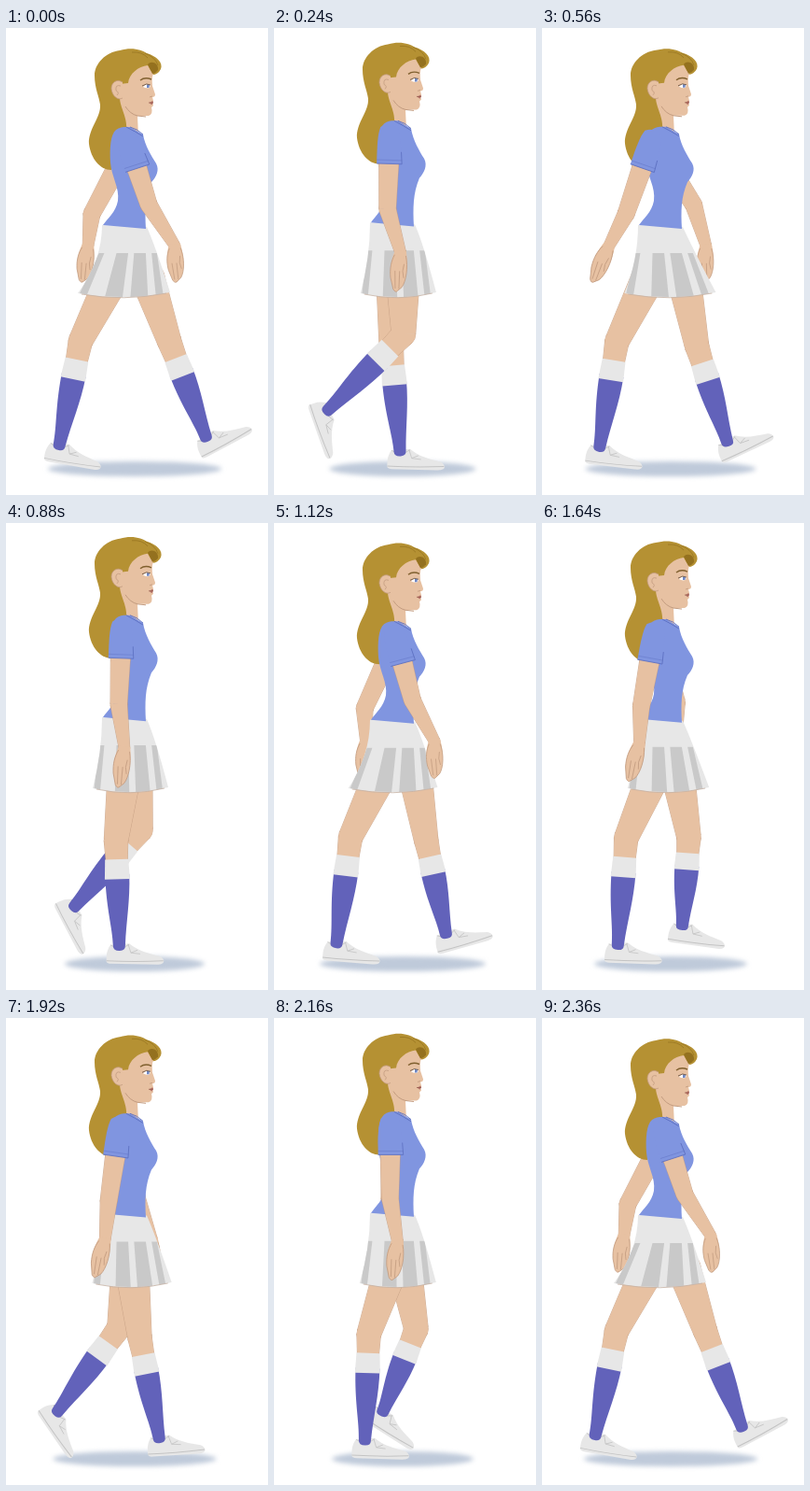
Animation of 281x500 px, one loop 2400 ms. Source, as an HTML page with a canvas:

```html
<!DOCTYPE html>
<html lang="en">
<head>
<meta charset="utf-8">
<title>Walk cycle</title>
<style>
html, body { margin: 0; width: 100%; height: 100%; overflow: hidden; background: #fff; }
canvas { display: block; }
</style>
</head>
<body>
<canvas id="stage" width="281" height="500"></canvas>
<script>
const ctx = document.getElementById('stage').getContext('2d');
const LOOP = 2400, STEP = 40, CYCLE = 1180;
const SKIN = '#e7c1a2', SKIN_LINE = '#c39c80', HAIR = '#b59133', HAIR_DARK = '#94711f';
const SHIRT = '#8095e0', SHIRT_LINE = '#5c6fc0', SOCK = '#6262ba', WHITE = '#e7e7e7', GREY = '#c9c9c9';

// Key poses of one step: time since heel strike, knee x y, ankle x y, foot angle
const LEG = [
  [0, 175, 335, 216, 441, -28],
  [180, 137, 342, 155, 455, 0],
  [290, 118, 340, 122, 456, 1],
  [590, 80, 335, 57, 450, 10],
  [750, 124, 331, 54, 423, 58],
  [855, 142, 328, 62, 412, 68],
  [1150, 166, 340, 200, 446, -25]
];

const angleAt = p => p / CYCLE * 2 * Math.PI;
// Limbs rest at both ends of the swing and pass the middle quickly
const swing = p => Math.cos(angleAt(p)) ** 3;

// Smooth periodic interpolation through unevenly spaced keys
function pose(keys, time) {
  const t = time % CYCLE, n = keys.length;
  const key = i => {
    const k = keys[(i + n) % n].slice();
    k[0] += Math.floor(i / n) * CYCLE;
    return k;
  };
  let i = n - 1;
  while (keys[i][0] > t) i--;
  const [a, b, c, d] = [key(i - 1), key(i), key(i + 1), key(i + 2)];
  const span = c[0] - b[0], u = (t - b[0]) / span, v = 1 - u;
  return b.map((_, j) => {
    const m0 = (c[j] - a[j]) / (c[0] - a[0]) * span;
    const m1 = (d[j] - b[j]) / (d[0] - b[0]) * span;
    return v * v * ((1 + 2 * u) * b[j] + u * m0) + u * u * ((3 - 2 * u) * c[j] - v * m1);
  }).slice(1);
}

function fill(path, color) {
  ctx.fillStyle = color;
  ctx.fill(new Path2D(path));
}

function line(path, color, width = 1) {
  ctx.strokeStyle = color;
  ctx.lineWidth = width;
  ctx.stroke(new Path2D(path));
}

// Rounded, tapering limb through [x, y, radius] joints
function limb(joints) {
  const shape = new Path2D();
  joints.forEach(([x, y, r], i) => {
    shape.moveTo(x + r, y);
    shape.arc(x, y, r, 0, 7);
    if (!i) return;
    const [px, py, pr] = joints[i - 1];
    const a = Math.atan2(y - py, x - px), s = Math.sin(a), c = Math.cos(a);
    shape.moveTo(px - s * pr, py + c * pr);
    shape.lineTo(px + s * pr, py - c * pr);
    shape.lineTo(x + s * r, y - c * r);
    shape.lineTo(x - s * r, y + c * r);
    shape.closePath();
  });
  ctx.strokeStyle = SKIN_LINE;
  ctx.lineWidth = .8;
  ctx.stroke(shape);
  ctx.fillStyle = SKIN;
  ctx.fill(shape);
}

// Draw in a frame whose y axis runs along a bone of the given nominal length
function along(x0, y0, x1, y1, length, draw) {
  ctx.save();
  ctx.translate(x0, y0);
  ctx.rotate(Math.atan2(y1 - y0, x1 - x0) - Math.PI / 2);
  ctx.scale(1, Math.hypot(x1 - x0, y1 - y0) / length);
  draw();
  ctx.restore();
}

function leg(p) {
  const [kx, ky, ax, ay, tilt] = pose(LEG, p);
  const hx = 133 + 19 * swing(p) - 6 * Math.sin(angleAt(p));
  limb([[hx, 268, 18], [kx, ky, 12.8], [kx + (ax - kx) * .19, ky + (ay - ky) * .19, 11.5]]);
  ctx.save();
  ctx.translate(ax, ay);
  ctx.rotate(tilt * Math.PI / 180);
  fill('M-10-4C-15 3-14 10-14 14Q-13 16-9 16L40 16C50 16 49 10 43 7C31 4 20 2 10-6Z', WHITE);
  line('M-14 13Q15 14 47 12', '#c4c4c4');
  line('M-10-4Q0 3 10-5M9-5L12 4 19 1M12 4L22 5', '#c4c4c4', .8);
  ctx.restore();
  along(kx, ky, ax, ay, 115, () => {
    fill('M-13 36L13 36C13 65 8 85 6 112Q6 117 0 117Q-7 117-7 112C-7 92-13 72-13 36Z', SOCK);
    fill('M-12.5 20L12.5 20 13.5 41-13.5 41Z', WHITE);
  });
}

// Each joint's x follows [middle, swing, bow at mid-swing, lag]
const NEAR_ARM = { shoulder: [124, 6, 0, 0], elbow: [121, 32, 0, 0], wrist: [125, 56, 6, 4], tip: [117, 66, 9, 5] };
const FAR_ARM = { shoulder: [126, -10, 0, 0], elbow: [128, 36, 0, 0], wrist: [134, 46, -6, 14], tip: [131, 49, -8, 20] };

function arm(joints, p, sy, sleeved) {
  const sin = Math.sin(angleAt(p)), cos = Math.cos(angleAt(p));
  const [sx, ex, wx, tx] = Object.values(joints)
    .map(([middle, reach, bow, lag]) => middle + reach * swing(p) + bow * sin * sin + lag * sin);
  const ey = 194 - 5 * swing(p), wy = 241 - 8 * cos * cos, ty = 283 - 11 * cos * cos;
  const len = Math.hypot(ex - sx, ey - sy), q = 34 / len;
  limb([[sx + (ex - sx) * q, sy + (ey - sy) * q, 10.5], [ex, ey, 9], [wx, wy, 5.8]]);
  along(wx, wy, tx, ty, 42, () => {
    fill('M-6-2C-9 8-10 18-8 28L-4 40Q-1 44 1 41L5 37C9 30 10 15 6-2Z', SKIN);
    line('M-6 3C-9 10-10 18-8 28L-4 40Q-1 44 1 41L5 37C9 30 10 15 6 3', SKIN_LINE, .8);
    line('M-4 20L-2 39M1 20L2 39M5 12Q3 20 6 27', SKIN_LINE, .8);
  });
  if (!sleeved) return;
  along(sx, sy, ex, ey, len, () => {
    fill('M-13 34C-13 15-13 3-10-5Q0-13 10-3C12 8 13 20 14 34Z', SHIRT);
    line('M-13 34L14 34M13 21L14 34', SHIRT_LINE, .8);
    line('M-13 30L14 30', SHIRT_LINE, .4);
  });
}

function shadow(p) {
  const half = 84 + 10 * Math.cos(2 * angleAt(p) - .4);
  ctx.save();
  ctx.filter = 'blur(2.5px)';
  ctx.fillStyle = '#bfcada';
  ctx.beginPath();
  ctx.ellipse(138, 472, half, 8, 0, 0, 7);
  ctx.fill();
  ctx.restore();
}

function skirt(p, dy) {
  const s = swing(p), flare = Math.cos(angleAt(p)) ** 4;
  const l = 93 - 5.5 * s - 10.5 * flare, r = 174 - 5.5 * s + 7.5 * flare;
  const top = 213 + dy, hip = 241 + dy;
  const hemX = f => l + (r - l) * f;
  const hemY = f => 284 + 16 * f * (1 - f);
  const hipX = f => 102 + 57 * f;
  const outline = `M103 ${top - 2}L151 ${top}Q160 ${hip - 8} ${r} 283Q${(l + r) / 2} 293 ${l} 284Q103 ${hip + 8} 103 ${top - 2}Z`;
  fill(outline, WHITE);
  ctx.save();
  ctx.clip(new Path2D(outline));
  for (let i = 0; i < 4; i++) {
    const a = .02 + i * .275, b = a + (i % 3 ? .19 : .08), h = i * .33 - .04, k = h + (i % 3 ? .22 : .1);
    fill(`M${hipX(h)} ${hip}L${hipX(k)} ${hip}L${hemX(b)} ${hemY(b)}L${hemX(a)} ${hemY(a)}Z`, GREY);
  }
  ctx.restore();
  line(`M${l + 4} 285Q${(l + r) / 2} 293 ${r - 4} 284`, '#c6b2a4', .8);
}

function torso(dy, hipDy) {
  ctx.save();
  ctx.translate(0, 213 + hipDy);
  ctx.scale(1, 1 + (hipDy - dy) / 106);
  ctx.translate(0, -214);
  fill('M118 110C123 106 130 107 133 107L147 115C149 127 156 138 161 146C165 153 161 161 156 166C149 182 149 197 150 216L104 212C108 206 118 198 120 186C122 172 113 160 112 145C111 130 112 115 118 110Z', SHIRT);
  line('M129 107Q139 112 147 117M133 107Q141 109 147 115', SHIRT_LINE, .9);
  ctx.restore();
}

function hair() {
  fill('M122 24C136 20 146 24 151 27C161 30 169 37 166 44Q163 50 157 50L140 60 127 74C125 84 132 94 131 110L119 113C112 122 115 138 113 152C101 152 91 140 89 124C88 108 102 96 101 82C100 74 95 64 95 51C95 38 107 26 122 24Z', HAIR);
}

function head() {
  fill('M122 60L131 59C132 49 142 41 152 40Q155 46 158 49C156 54 157 59 157 62L160 71Q160 74 157 74L158 78 157 80 158 83 156 85Q158 92 153 94L141 94 142 116 129 112C131 95 122 86 122 74Z', SKIN);
  line('M128 84Q133 92 141 94L150 95', SKIN_LINE);
  fill('M152 39C156 34 164 38 163 45Q161 48 157 49Z', HAIR_DARK);
  line('M135 26Q146 25 152 32M149 27Q160 31 163 40', HAIR_DARK, .7);
  fill('M125 58C119 54 113 58 113 65C114 73 120 78 125 75Z', SKIN);
  line('M125 58C119 54 113 58 113 65C114 73 120 78 125 75M123 62Q117 60 118 67Q122 69 119 72', SKIN_LINE, .8);
  line('M144 56Q149 52 156 55', '#80602f', 1.4);
  fill('M147 63Q151 58 155 61L154 64Q150 65 147 63Z', '#fff');
  fill('M151 60.500L154 60.500 153.500 64 151 64Z', '#6f87c4');
  line('M146 62Q151 58.500 155 61', '#6d5442', .9);
  line('M154 74L157 73', SKIN_LINE, .9);
  fill('M154 80L157 78 158 79 157 82Q155 82.500 154 80Z', '#b9786a');
  line('M153 80L158 80', '#8a4c43', .7);
}

function draw(now) {
  const t = now % LOOP, p = Math.floor(t / STEP) * STEP % CYCLE, opposite = p + CYCLE / 2;
  const dy = 3.6 * (Math.cos(2 * angleAt(p)) - 1), hipDy = dy * .4;
  ctx.fillStyle = '#fff';
  ctx.fillRect(0, 0, 281, 500);
  shadow(p);
  arm(FAR_ARM, opposite, 118 + dy, false);
  leg(p);
  leg(opposite);
  skirt(p, hipDy);
  ctx.save();
  ctx.translate(0, dy);
  hair();
  head();
  ctx.restore();
  torso(dy, hipDy);
  arm(NEAR_ARM, p, 118 + dy, true);
}

function tick() {
  draw(performance.now());
  requestAnimationFrame(tick);
}
tick();
</script>
</body>
</html>
```
